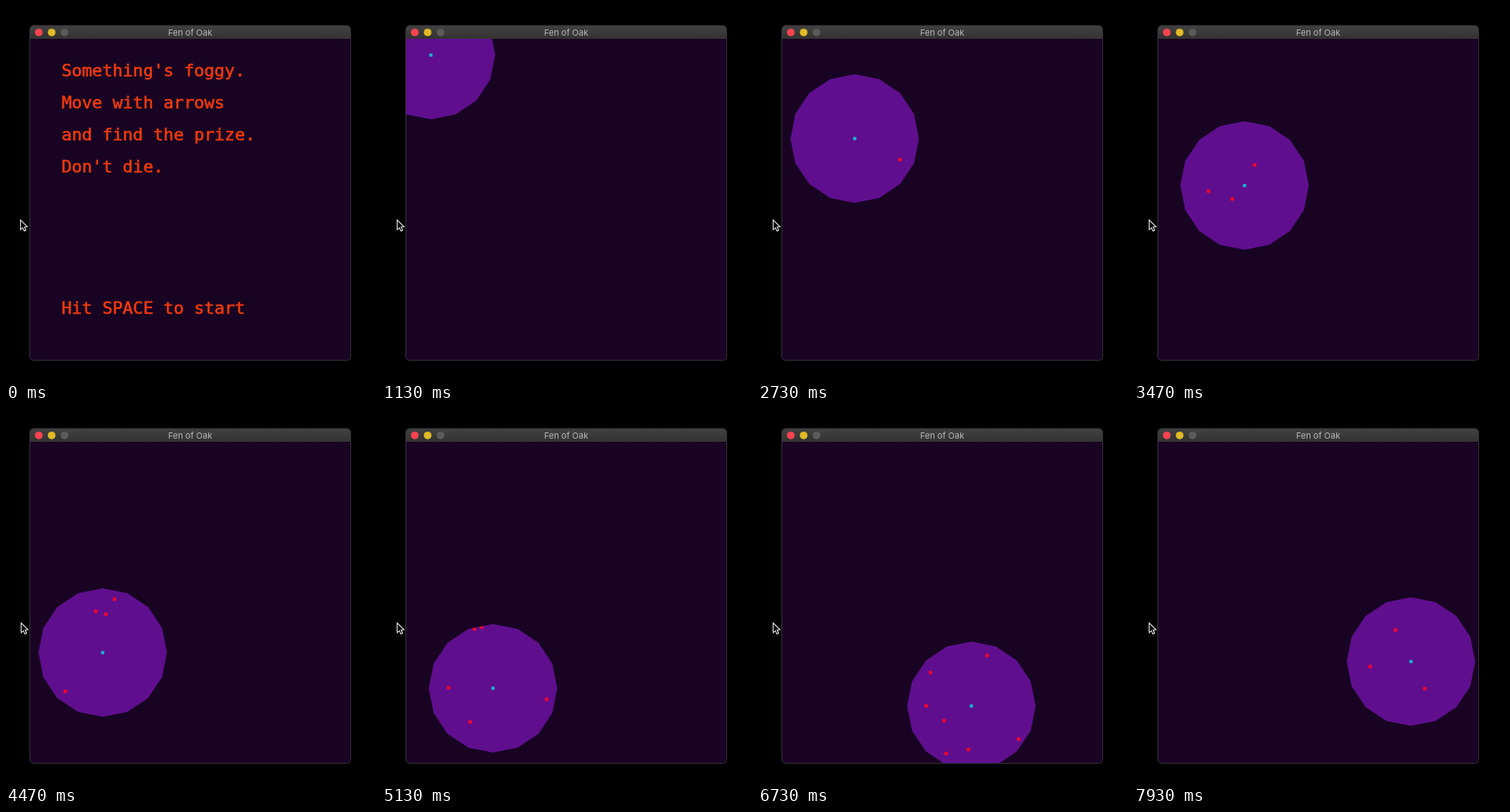
An HTML page with a canvas that plays this animation: 474x480 px, repeating every 8000 ms.

```html
<!DOCTYPE html>
<html lang="en">
<head>
<meta charset="utf-8">
<title>Fen of Oak</title>
<style>
  html, body { margin: 0; width: 100%; height: 100%; overflow: hidden; background: #000; }
  canvas { display: block; }
</style>
</head>
<body>
<canvas id="stage" width="474" height="480"></canvas>
<script>
const ctx = document.getElementById('stage').getContext('2d');
const FPS = 15, FRAMES = 120, START_FRAME = 5, SPEED = 82, SIGHT = 82.3;

// Arrow keys held down: direction, start and end in seconds
const keys = [
  ['right', 1, 1.38], ['down', 1.43, 4.81], ['right', 2.1, 2.6],
  ['right', 3.25, 3.54], ['left', 3.54, 3.83], ['right', 4.91, 7.83],
  ['down', 4.92, 5.6], ['up', 5.95, 6.14], ['up', 7.24, 8], ['left', 7.83, 8]
];
const steps = { left: [-1, 0], right: [1, 0], up: [0, -1], down: [0, 1] };

function playerAt(frame) {
  let x = 51.7, y = 62.8;
  for (const [key, from, to] of keys) {
    const way = SPEED * Math.max(0, Math.min(frame / FPS, to) - from);
    x += steps[key][0] * way;
    y += steps[key][1] * way;
  }
  return { x, y };
}

// An enemy heads for the player; its path runs both ways from one known place
function chase(home, x, y, speed) {
  const path = [];
  for (const dir of [1, -1]) {
    let spot = { x, y };
    for (let f = home; f >= 0 && f < FRAMES; f += dir) {
      path[f] = spot;
      const player = playerAt(f);
      const angle = Math.atan2(player.y - spot.y, player.x - spot.x);
      const way = dir * speed / FPS;
      spot = { x: spot.x + way * Math.cos(angle), y: spot.y + way * Math.sin(angle) };
    }
  }
  return path;
}

const enemies = [
  chase(52, 154.5, 203.5, 43), chase(52, 95.5, 237, 34), chase(52, 126, 247, 25),
  chase(67, 76, 361.5, 16), chase(87, 121.5, 398, 14),
  chase(101, 221, 337.5, 18), chase(101, 215.5, 380, 17), chase(101, 238.5, 399, 16),
  chase(101, 241, 441, 11), chase(101, 293.5, 315.5, 17), chase(101, 269.5, 436, 16),
  chase(101, 334, 422.5, 16), chase(119, 335, 283, 16), chase(119, 372.5, 358, 16)
];

function polygon(points) {
  ctx.beginPath();
  points.forEach(([x, y]) => ctx.lineTo(x, y));
  ctx.closePath();
}

function box(x, y, w, h, color) {
  ctx.fillStyle = color;
  ctx.fillRect(x, y, w, h);
}

function dot({ x, y }, size, color) {
  box(x - size / 2, y - size / 2, size, size, color);
}

function windowShape() {
  ctx.beginPath();
  ctx.roundRect(30.5, 25, 411, 428.5, 5);
}

function drawWindow() {
  box(30, 42, 412, 412, '#180323');
  const bar = ctx.createLinearGradient(0, 25, 0, 42);
  bar.addColorStop(0, '#424242');
  bar.addColorStop(1, '#333231');
  box(30, 25, 412, 17, bar);
  ['#fb4350', '#e1ba25', '#5a5a59'].forEach((color, i) => {
    ctx.fillStyle = color;
    ctx.beginPath();
    ctx.arc(42 + i * 16.5, 33.8, 4.9, 0, 7);
    ctx.fill();
  });
  ctx.font = '11px Inter, sans-serif';
  ctx.fillStyle = '#b8b8b8';
  ctx.textAlign = 'center';
  ctx.fillText('Fen of Oak', 236, 37.7);
}

function drawIntro() {
  const lines = ["Something's foggy.", 'Move with arrows', 'and find the prize.', "Don't die."];
  ctx.font = '21.7px "DejaVu Sans Mono", monospace';
  ctx.textAlign = 'left';
  ctx.fillStyle = ctx.strokeStyle = '#ee3a0e';
  ctx.lineWidth = 0.6;
  const write = (text, y) => {
    ctx.fillText(text, 71.2, y);
    ctx.strokeText(text, 71.2, y);
  };
  lines.forEach((line, i) => write(line, 90 + i * 41));
  write('Hit SPACE to start', 394);
}

function drawGame(frame) {
  const player = playerAt(frame);
  ctx.beginPath();
  ctx.rect(31, 42, 410, 411);
  ctx.clip();
  polygon(Array.from({ length: 16 }, (_, i) => {
    const a = i * Math.PI / 8;
    return [player.x + SIGHT * Math.cos(a), player.y + SIGHT * Math.sin(a)];
  }));
  ctx.fillStyle = '#5f0f8e';
  ctx.fill();
  ctx.clip();
  enemies.forEach(path => dot(path[frame], 4.4, '#f0052f'));
  dot(player, 4, '#14b8cf');
}

function drawCursor(x, y) {
  polygon([[0, 0], [0, 12.5], [2.8, 10], [4.9, 14.2], [7, 13.2], [5.1, 9.2], [8.8, 8.8]]
    .map(([dx, dy]) => [x + dx, y + dy]));
  ctx.fillStyle = '#000';
  ctx.fill();
  ctx.lineWidth = 1.1;
  ctx.strokeStyle = '#e8e8e8';
  ctx.stroke();
}

function draw(ms) {
  const clock = Math.floor(ms / 10) * 10 + 5;
  const frame = Math.floor(clock * FPS / 1000) % FRAMES;
  box(0, 0, 474, 480, '#000');
  ctx.save();
  windowShape();
  ctx.clip();
  drawWindow();
  if (frame < START_FRAME) drawIntro();
  else drawGame(frame);
  ctx.restore();
  windowShape();
  ctx.lineWidth = 1;
  ctx.strokeStyle = '#37313d';
  ctx.stroke();
  drawCursor(frame ? 19.4 : 18.6, 273.8);
}

function tick(now) {
  draw(now);
  requestAnimationFrame(tick);
}
draw(0);
requestAnimationFrame(tick);
</script>
</body>
</html>
```
